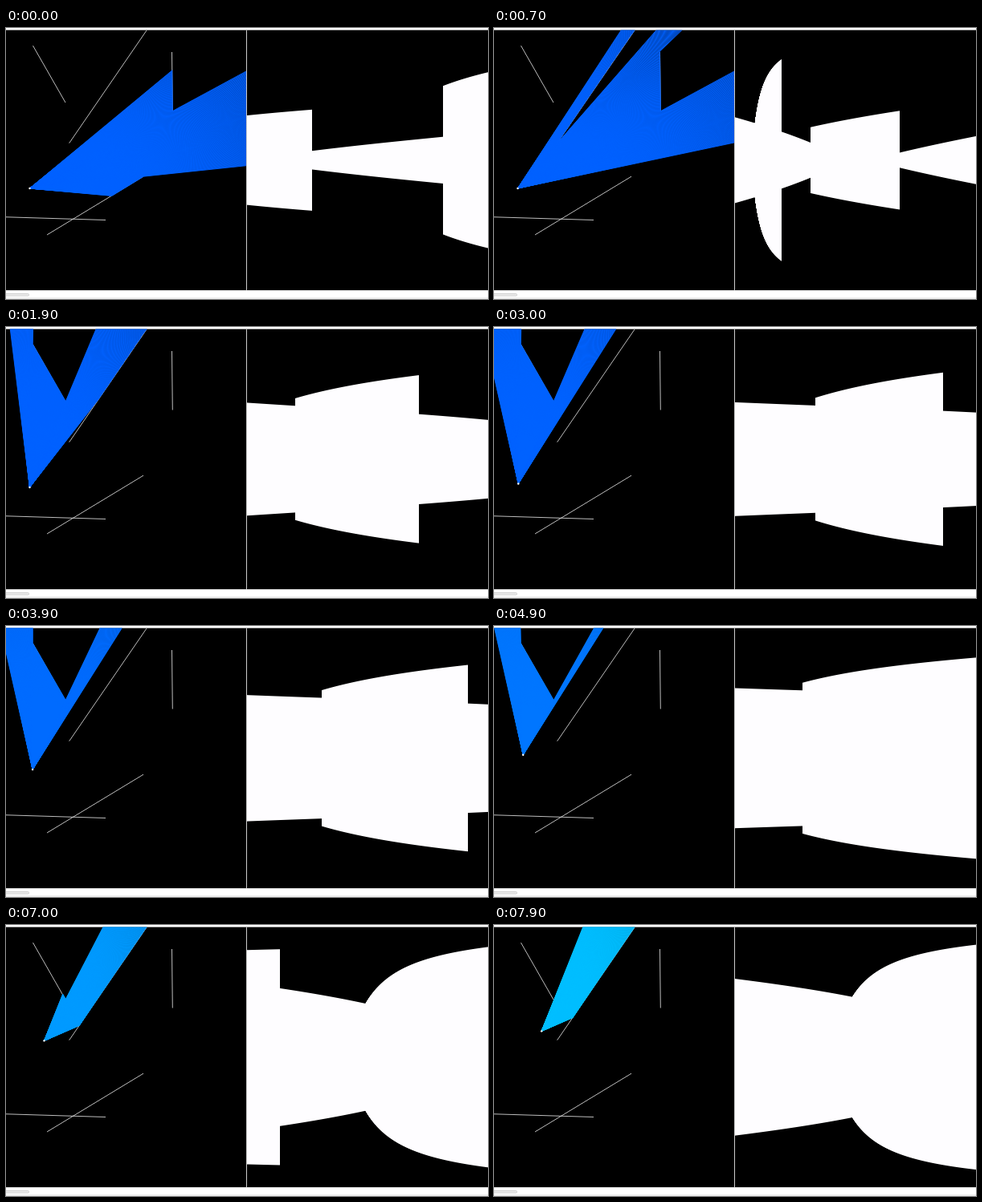
An HTML page with a canvas for the animation above (8 s loop, 600x338 px).

```html
<!DOCTYPE html>
<html>
<head>
<meta charset="utf-8">
<style>
html, body { margin: 0; width: 100%; height: 100%; overflow: hidden; background: #fff; }
canvas { display: block; }
</style>
</head>
<body>
<canvas width="600" height="338"></canvas>
<script>
const ctx = document.querySelector('canvas').getContext('2d');
const LOOP = 8000, SIZE = 324.5, TOP = 2.6, RIGHT = 299.5;
const LEFT = RIGHT - SIZE, BOTTOM = TOP + SIZE, FOV = Math.PI / 4;

// Walls as x1, y1, x2, y2
const inner = [
  [33.5, 22, 74, 93], [175, 3, 78.7, 143.6], [206.5, 30, 207.3, 103.5],
  [LEFT, 235, 124, 239.5], [51, 258, 171, 185.2]
];
const border = [
  [LEFT, TOP, RIGHT, TOP], [RIGHT, TOP, RIGHT, BOTTOM],
  [RIGHT, BOTTOM, LEFT, BOTTOM], [LEFT, BOTTOM, LEFT, TOP]
];
const walls = [...inner, ...border];

// Time in ms and left turn in tenths of a radian
const turns = [[0, 0], [700, 3], [1800, 8], [1900, 10], [2700, 11],
  [5200, 11], [5400, 6], [5800, 6], [6200, 5], [LOOP, 5]];
const SPEED = 0.0185;

function turnAt(t) {
  const i = turns.findIndex(k => k[0] > t);
  const [t0, a] = turns[i - 1], [t1, b] = turns[i];
  return a + (b - a) * (t - t0) / (t1 - t0);
}

function poseAt(t) {
  const first = Math.min(Math.max(t - 2750, 0), 2470) * SPEED;
  const second = Math.max(t - 6200, 0) * SPEED;
  return {
    x: 29.5 + first * Math.cos(1.4) + second * Math.cos(0.8),
    y: 200 - first * Math.sin(1.4) - second * Math.sin(0.8),
    heading: -0.3 - turnAt(t) / 10
  };
}

function cast(x, y, angle) {
  const dx = Math.cos(angle), dy = Math.sin(angle);
  let nearest = 2 * SIZE;
  for (const [x1, y1, x2, y2] of walls) {
    const wx = x2 - x1, wy = y2 - y1, det = dx * wy - dy * wx;
    if (!det) continue;
    const dist = ((x1 - x) * wy - (y1 - y) * wx) / det;
    const along = ((x1 - x) * dy - (y1 - y) * dx) / det;
    if (dist > 0 && along >= 0 && along <= 1) nearest = Math.min(nearest, dist);
  }
  return nearest;
}

function line(x1, y1, x2, y2) {
  ctx.beginPath();
  ctx.moveTo(x1, y1);
  ctx.lineTo(x2, y2);
  ctx.stroke();
}

function rect(color, x, y, w, h) {
  ctx.fillStyle = color;
  ctx.fillRect(x, y, w, h);
}

function drawPage() {
  rect('#fff', 0, 0, 600, 338);
  rect('#000', 0, TOP, 600, SIZE);
  rect('#ddd', 0, 336.5, 600, 1);
  ctx.fillStyle = '#eee';
  ctx.strokeStyle = '#ccc';
  ctx.lineWidth = 1;
  ctx.beginPath();
  ctx.roundRect(-5, 331.5, 33.5, 2.5, 1);
  ctx.fill();
  ctx.stroke();
}

function draw(t) {
  const { x, y, heading } = poseAt(t);
  drawPage();

  ctx.save();
  ctx.beginPath();
  ctx.rect(0, TOP, RIGHT, SIZE);
  ctx.clip();
  ctx.lineWidth = 0.8;
  ctx.strokeStyle = '#eee';
  inner.forEach(w => line(...w));

  ctx.lineWidth = 0.95;
  ctx.strokeStyle = `rgb(0, ${Math.round(97 + 3.15 * (x - 29.5))}, 255)`;
  const heights = [];
  for (let i = 0; i < SIZE; i++) {
    const offset = (i / SIZE - 0.5) * FOV, angle = heading + offset;
    const dist = cast(x, y, angle), reach = dist + 0.6;
    line(x, y, x + reach * Math.cos(angle), y + reach * Math.sin(angle));
    heights.push(Math.max(0, SIZE - dist * Math.cos(offset)));
  }
  ctx.fillStyle = '#fff';
  ctx.beginPath();
  ctx.arc(x, y, 1.2, 0, 7);
  ctx.fill();
  ctx.restore();

  heights.forEach((h, i) => rect('#fefdff', 300 + i, TOP + (SIZE - h) / 2, 1, h));
  rect('#ccc', 299, TOP, 1, SIZE);
}

function frame() {
  draw(Math.floor(performance.now() % LOOP / 100) * 100);
  requestAnimationFrame(frame);
}
frame();
</script>
</body>
</html>
```
